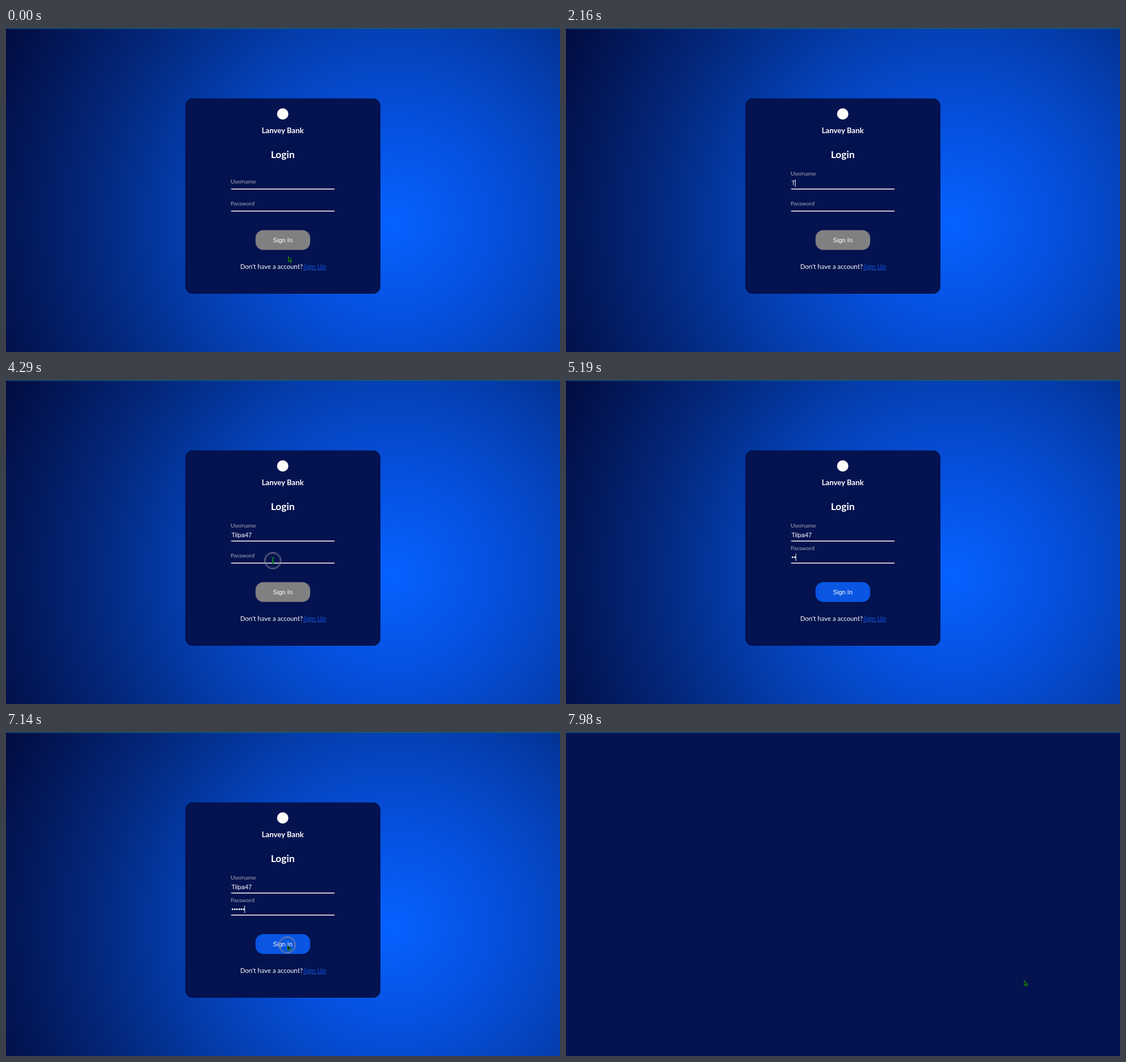
Write an HTML page that moves like this. It is 978x573 px and loops after 8 s.

```html
<!DOCTYPE html>
<html lang="en">
<head>
<meta charset="utf-8">
<title>Login</title>
<style>
  html, body { margin: 0; width: 100%; height: 100%; overflow: hidden; background: #04124f; }
  #page {
    position: absolute; inset: 0;
    background: radial-gradient(circle at 70% 60%, #0562ff, #0651e0 22%, #0440b4 45%, #03277a 70%, #020b3f);
  }
  svg { position: absolute; left: 0; top: 0; }
  text { font-family: Lato, "Open Sans", sans-serif; fill: #fff; white-space: pre; }
  .bold { font-weight: 700; text-anchor: middle; }
  .label { font-size: 10px; fill: #a9abb6; }
  .input { font: 11.1px "Liberation Sans", Arial, sans-serif; }
  .line { stroke: #fff; stroke-width: 1.4; }
</style>
</head>
<body>
<div id="page"></div>
<svg width="978" height="573" viewBox="0 0 978 573">
  <g id="form">
    <rect x="316.5" y="124.5" width="344.5" height="345.5" rx="13" fill="#04124f"/>
    <circle cx="488.5" cy="152" r="10" fill="#fff"/>
    <text class="bold" x="488.5" y="185.5" font-size="13.2">Lanvey Bank</text>
    <text class="bold" x="488.5" y="229.5" font-size="17.5">Login</text>
    <path class="line" d="M397.5 284.7H580M397.5 323.7H580"/>
    <text class="label" id="userLabel" x="396.5">Username</text>
    <text class="label" id="passLabel" x="396.5">Password</text>
    <text class="input" id="user" x="398" y="278"></text>
    <text class="input" id="pass" x="398" y="317.4"></text>
    <rect id="caret" width="1" height="13" fill="#fff"/>
    <rect id="button" x="440.5" y="357.5" width="96.5" rx="14"/>
    <text class="input" id="signIn" x="488.6" y="378.7" text-anchor="middle">Sign In</text>
    <path id="spinner" d="M-6.1 6.1A8.6 8.6 0 1 0 -6.1 -6.1" fill="none" stroke="#fff" stroke-width="2"/>
    <g id="footer">
      <text x="413.5" y="426" font-size="11.4">Don't have a account?</text>
      <text x="524.5" y="426" font-size="11.9" style="fill:#0d55e0" text-decoration="underline">Sign Up</text>
    </g>
  </g>
  <rect width="978" height="1.3" fill="#0d6878"/>
  <g id="cursor">
    <g id="ring" fill="none">
      <circle r="14.5" stroke="#9a9ca6"/>
      <circle r="12.6" stroke="#62677f" stroke-width=".9"/>
    </g>
    <path id="arrow" d="M.5 .5V9.5L2.6 7.7L4.2 11L5.6 10.3L4.1 7.2H6.8Z" fill="#07240f" stroke="#2fa51c" stroke-width=".9"/>
    <path id="beam" d="M-2.5 -5.5Q0 -5.5 0 -3.5Q0 -5.5 2.5 -5.5M0 -3.5V3.5M-2.5 5.5Q0 5.5 0 3.5Q0 5.5 2.5 5.5M-1.5 1H1.5" fill="none" stroke="#0d8a1c" stroke-width="1.6"/>
  </g>
</svg>
<script>
const LOOP = 8000, BLINK = 455;
const USER_FOCUS = 920, PASS_FOCUS = 4310, SUBMIT = 7200, LEAVE = 7950;
const NAME = 'Tilpa47';
const userKeys = [2130, 2370, 2490, 2670, 2790, 3390, 3600];
const passKeys = [4770, 5190, 5460, 5700, 5970, 6180];

// time, x, y of the pointer
const path = [
  [0, 498, 404], [30, 498, 403], [330, 478, 152], [600, 471, 264], [780, 471, 264],
  [900, 471, 278], [1060, 471, 278], [1400, 459.5, 272.5], [3750, 459.5, 272.5],
  [4020, 474, 328], [4200, 471, 319.5], [6350, 471, 319.5], [6430, 478, 413],
  [6480, 481.5, 407], [6800, 495, 378], [7290, 497, 376], [7500, 600, 400],
  [7650, 715, 423], [7830, 782, 432.5], [7980, 808.5, 439], [8000, 810, 439.5]
];

const el = {};
document.querySelectorAll('[id]').forEach(e => el[e.id] = e);
const show = (e, on) => e.style.display = on ? '' : 'none';
const within = (t, a, b) => t >= a && t < b;
const clamp = v => Math.min(1, Math.max(0, v));
const mix = (a, b, k) => a + (b - a) * k;
const typed = (keys, t) => keys.filter(k => k <= t).length;

// Standard CSS "ease", solved by bisection
function ease(p) {
  const bez = (a, b, s) => 3 * a * s * (1 - s) ** 2 + 3 * b * s * s * (1 - s) + s ** 3;
  let lo = 0, hi = 1;
  for (let i = 0; i < 20; i++) {
    const mid = (lo + hi) / 2;
    if (bez(.25, .25, mid) < p) lo = mid; else hi = mid;
  }
  return bez(.1, 1, lo);
}

function pointerAt(t) {
  const i = path.findIndex(p => p[0] > t);
  const [t0, x0, y0] = path[i - 1], [t1, x1, y1] = path[i];
  const k = (t - t0) / (t1 - t0);
  return [mix(x0, x1, k), mix(y0, y1, k)];
}

function drawFields(t) {
  const raise = start => 13.7 * ease(clamp((t - start) / 290));
  el.userLabel.setAttribute('y', 275 - raise(USER_FOCUS));
  el.passLabel.setAttribute('y', 314.3 - raise(PASS_FOCUS));
  el.user.textContent = NAME.slice(0, typed(userKeys, t));
  el.pass.textContent = '•'.repeat(typed(passKeys, t));

  const onPass = t >= PASS_FOCUS;
  const field = onPass ? el.pass : el.user;
  const resets = onPass ? [PASS_FOCUS, ...passKeys] : [USER_FOCUS, ...userKeys];
  const last = resets.filter(k => k <= t).pop();
  const lit = last !== undefined && Math.floor((t - last) / BLINK) % 2 === 0;
  const width = field.textContent ? field.getComputedTextLength() : 0;
  el.caret.setAttribute('x', 397.5 + width);
  el.caret.setAttribute('y', onPass ? 307 : 268);
  show(el.caret, lit && t < SUBMIT);
}

function drawButton(t) {
  const k = ease(clamp((t - 4750) / 110)), loading = t >= SUBMIT;
  const rgb = [[128, 10], [128, 86], [128, 226]].map(([a, b]) => Math.round(mix(a, b, k)));
  el.button.setAttribute('fill', `rgb(${rgb})`);
  el.button.setAttribute('height', loading ? 36.5 : 35);
  show(el.signIn, !loading);
  show(el.spinner, loading);
  el.spinner.setAttribute('transform', `translate(488.6 375.5) rotate(${25 + (t - 7830) * .36})`);
  el.footer.setAttribute('transform', `translate(0 ${loading ? 1.3 : 0})`);
}

function drawCursor(t) {
  const beam = within(t, 4140, 4770) || within(t, 6350, 6375);
  el.cursor.setAttribute('transform', `translate(${pointerAt(t)})`);
  show(el.cursor, !within(t, 2160, 3750) && !within(t, 4770, 6350));
  show(el.beam, beam);
  show(el.arrow, !beam);
  show(el.ring, [840, 4230, 7080].some(c => within(t, c, c + 110)));
}

function frame() {
  const t = performance.now() % LOOP;
  show(el.page, t < LEAVE);
  show(el.form, t < LEAVE);
  drawFields(t);
  drawButton(t);
  drawCursor(t);
  requestAnimationFrame(frame);
}
frame();
</script>
</body>
</html>
```
